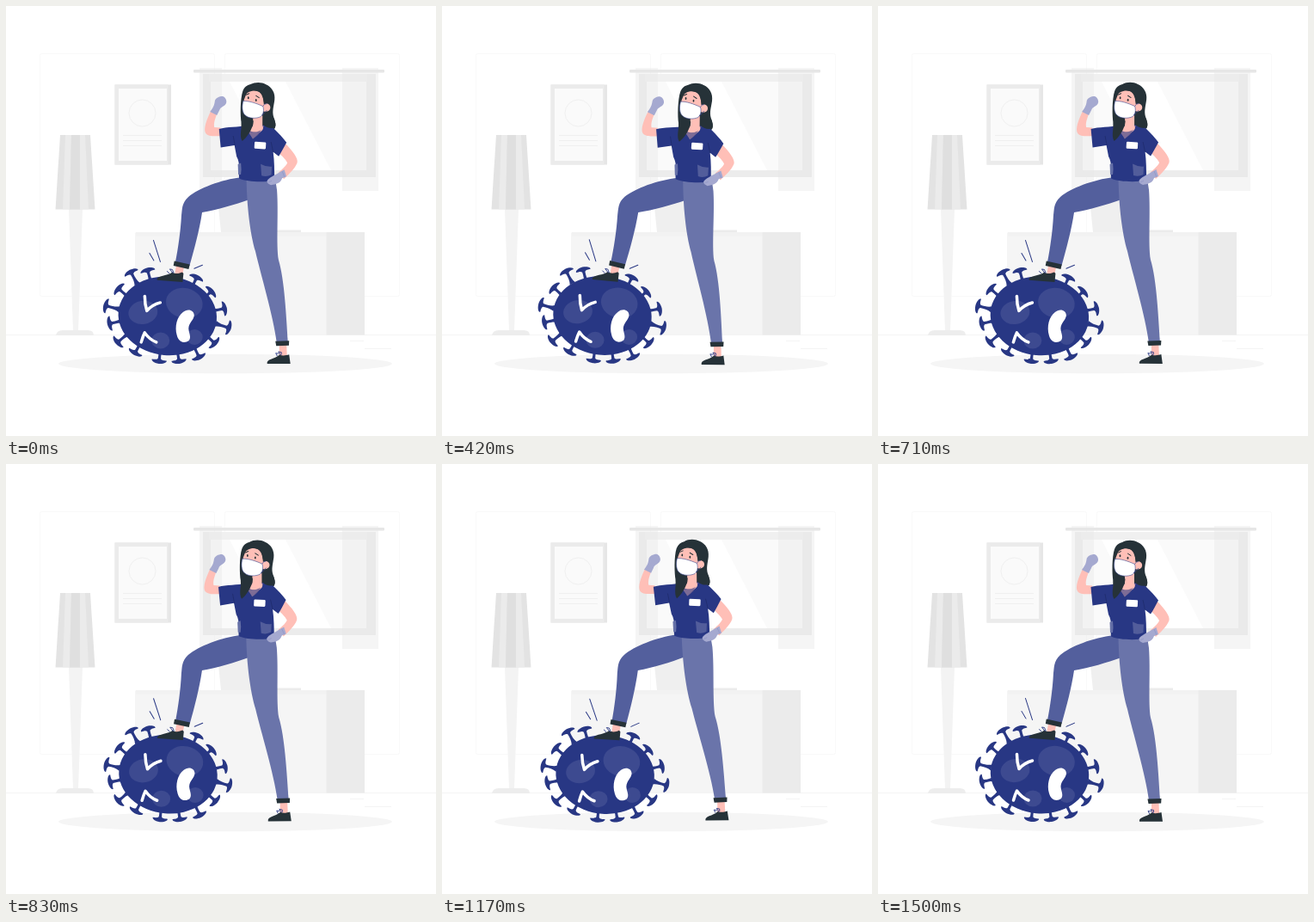
An HTML page for the animation above (1.54 s loop, 500x500 px).

```html
<!DOCTYPE html>
<html lang="en">
<head>
<meta charset="utf-8">
<title>Victory pose</title>
<style>
  html, body { margin: 0; width: 100%; height: 100%; overflow: hidden; background: #fff; }
  svg { display: block; width: 100vw; height: 100vh; }
  .navy { fill: #283784; }
  .ink { fill: #263238; }
  .skin { fill: #ffbfb7; }
  .glove { fill: #a5a9d0; }
  .line { fill: none; stroke: #283784; stroke-linecap: round; }
</style>
</head>
<body>
<svg viewBox="0 0 500 500">
  <g id="room">
    <g fill="none" stroke="#f9f9f9">
      <rect x="39.500" y="55.500" width="203" height="282" rx="2"/>
      <rect x="254.500" y="55.500" width="203" height="282" rx="2"/>
      <path d="M0 382.500H500" stroke="#f4f4f4"/>
      <path d="M400 389.500H416M417 398.500H448" stroke="#f4f4f4"/>
    </g>

    <!-- window -->
    <rect x="229" y="79" width="201" height="120" fill="#ececec"/>
    <rect x="236" y="79" width="184" height="9" fill="#f0f0f0"/>
    <rect x="238" y="88" width="181" height="103" fill="#fafafa"/>
    <path d="M260 88H325L378 191H313Z" fill="#fff"/>
    <g fill="#e8e8e8" opacity=".4">
      <path d="M225 72H251V215H225ZM391 72H433V215H391Z"/>
      <path d="M230 72H236V215H230ZM241 72H246V215H241ZM397 72H405V215H397ZM410 72H419V215H410ZM424 72H428V215H424Z"/>
    </g>
    <rect x="218" y="74" width="222" height="3.500" rx="1" fill="#e6e6e6"/>

    <!-- framed certificate -->
    <rect x="126.500" y="91.500" width="65.500" height="93" fill="#e6e6e6"/>
    <rect x="126.500" y="91.500" width="62" height="93" fill="#ebebeb"/>
    <rect x="131" y="96" width="56" height="84" fill="#fafafa"/>
    <g fill="none" stroke="#f0f0f0">
      <circle cx="158.500" cy="124.500" r="15.500"/>
      <path d="M136 150.500H181M136 156.500H181M136 162.500H181"/>
    </g>

    <!-- desk -->
    <path d="M246 224H289V263H250Z" fill="#efefef"/>
    <rect x="284" y="260.500" width="59" height="3" fill="#ebebeb"/>
    <rect x="150" y="263" width="267" height="119.500" rx="1.500" fill="#f5f5f5"/>
    <rect x="151" y="263" width="222" height="4.500" fill="#f2f2f2"/>
    <rect x="372.500" y="263" width="44.500" height="119.500" fill="#ebebeb"/>

    <!-- lamp -->
    <path d="M73 236H89L84 378H78Z" fill="#f3f3f3"/>
    <path d="M58 383Q59 377 66 377H95Q102 377 102 383Z" fill="#ededed"/>
    <path d="M63 150H98L103.500 236.500H57.500Z" fill="#e3e3e3"/>
    <path d="M69 150H76L74 236.500H66ZM86 150H92L96 236.500H86Z" fill="#ebebeb"/>
    <path d="M76 150H86V236.500H74Z" fill="#dfdfdf"/>

    <ellipse cx="255" cy="416" rx="194" ry="11.300" fill="#f5f5f5"/>
  </g>

  <g id="hero">
    <!-- virus -->
    <g id="spikes" class="navy"></g>
    <ellipse class="navy" cx="188" cy="360.500" rx="57.300" ry="45.800" transform="rotate(5 188 360.500)"/>
    <g fill="#3d4a90">
      <ellipse cx="207.500" cy="345.500" rx="21.500" ry="17.500" transform="rotate(12 207.500 345.500)"/>
      <ellipse cx="159.500" cy="356.500" rx="17" ry="13.500" transform="rotate(-10 159.500 356.500)"/>
      <ellipse cx="180" cy="389" rx="10.500" ry="9.500"/>
      <ellipse cx="219.500" cy="385" rx="9.500" ry="9"/>
    </g>
    <path d="M161.500 337.500Q161.500 347 164 354.500Q170 347.500 179.500 345M157.500 391Q159.500 384 161.500 380Q167 388 175 391" fill="none" stroke="#fff" stroke-width="3.500" stroke-linecap="round" stroke-linejoin="round"/>
    <path d="M206 356C211 351.500 219 353 219 360C218 366 213 368 212.500 375C213 381 216 385 213 389C208 393 201 391 199 383C196 373 199 361 206 356Z" fill="#fff"/>
    <path class="line" d="M171.500 272.500L179.500 297.500M167 287.500L172 296M219 305.300L228.500 301.200"/>

    <!-- front leg on the virus -->
    <path class="skin" d="M198 302L207 304L205 314H196Z"/>
    <path class="ink" d="M175.500 317.500C178 313 188 314 193.500 309.500C197 312 202 311 205 309.500L206.500 311L205.500 321L176 318.800Z"/>
    <path class="line" d="M190 311L187.500 308.500M194 310.500L190.500 306L193.500 306.500L195 310" stroke-width=".9"/>
    <path d="M274 199C250 202 224 212 212 222C204 229 205 237 204 243C203 263 200 283 197 298L213.500 302C219 283 225 260 228 240C246 237 266 231 283 225L284 202Z" fill="#535f9d"/>
    <path class="ink" d="M195.800 296.500L213.800 300.500L212.500 306L194.800 302Z"/>

    <!-- standing leg -->
    <path class="skin" d="M318 393H326.500L327 407H318Z"/>
    <path class="ink" d="M304 415.800C303 410 312 411 318.500 405.300C322 407 326 406 329.500 405L331 415.800Z"/>
    <path class="line" d="M315.500 406.500L314 403.500L317 404M319.500 405.500L317 401.800L320.500 402.500V405" stroke-width=".9"/>
    <path d="M279.500 201C280 233 284 265 290 285C296 311 311 360 315 391L328 390C326 360 324 318 317 295C314 277 317 240 315 214L313 201Z" fill="#6a74aa"/>
    <path class="ink" d="M313.500 389.500L329.500 389L329.200 394.500L314.500 395Z"/>

    <!-- arms -->
    <path class="skin" d="M238.500 121C233 132 229 143 232 148C235 152 242 151.500 251 151L249 141.500L242 141C241 136 243 131 245.500 124Z"/>
    <path class="glove" d="M237 123C241 118 242 115 242.500 111C243 107 248 105 251.500 105C254 105 256.500 109 256 112C255 117 249 117 248 121L245 127Z"/>
    <path class="skin" d="M324 159C333 168 340 177 338.500 182C336 189 328 196 323 201L317 193C322 189 326 185 327 182C325 178 320 173 315 169Z"/>

    <!-- back hair -->
    <path class="ink" d="M284 91C289 88 297 88 302 91C309 94 313 101 312 109C311 117 309 122 311 129C313 134 314 138 312.500 142L309 144H284C281 148 278 154 274.500 157C271 151 274 143 273.500 136C272 128 272 108 275 99C277 94 280 92 284 91Z"/>

    <!-- torso -->
    <path class="navy" d="M247.500 143C256 140.500 270 141 281 139C286 141 293 140 300 138C305 139 309 140 312 143C317 148 322 153 326 158.500C323 164 320 170 317 174.500L310.500 169.500C312 180 312 192 312 203C298 205 280 204.500 271 200.500C270 193 273 184 268 175L265.500 162L249.500 164.500Z"/>
    <path d="M264 151L266 162M310.500 169.500L308 158" fill="none" stroke="#1d2a69" stroke-width=".7"/>
    <path class="ink" d="M299 130H311C313 135 314 138 312.500 141C308 143 302 141 299 138Z"/>
    <path d="M280 140L286.500 154.500C292 151 297 146 300 139Z" fill="#6c5f8f"/>
    <path class="skin" d="M287 127H298V139C300 142 298 146 293 147C288 147 282 146 281 142Q287 142 287 138Z"/>
    <path d="M281 146Q289 148 297 144L287 154.500Z" fill="#7d6c96"/>
    <path d="M296 183.500Q302 187 309 186.500L308.500 196Q303 199 297 197Z" fill="#525d9b"/>
    <path d="M269.500 184L273 182.500Q274 190 273 196H270Z" fill="#6570a7"/>
    <rect x="288.700" y="158" width="13.300" height="8" rx="1.200" fill="#fff" transform="rotate(3 295 162)"/>
    <path class="glove" d="M318 193L323.500 190L326 198L321 200C319 206 314 207 308 208C305 207 303 205 303.500 203C306 199 312 197 318 193Z"/>
    <path d="M321 192L324 199M305 205L309 203" fill="none" stroke="#8d93c4" stroke-width=".7"/>

    <!-- head -->
    <path class="ink" d="M276 123C280 128 286 130 287.500 134C287 143 279 154 274.500 157C271 151 274 143 273.500 136Z"/>
    <path class="skin" d="M280 100C283 97 294 97 298 103L300 114C304 112 308 115 307 119C306 123 301 123 299 122C298 129 292 131 285 130C277 127 275 118 276.500 109Z"/>
    <path class="ink" d="M275 109C276 104 279 102 282 100C285 98 290 98 293 99C297 101 299.500 107 299.500 114L304 112L308 99L291 90L277 96Z"/>
    <path d="M275.500 110.500C282 110 291 113 298.500 116.500C300 121 299 126 296 128.500C291 131 282 131 278 127C274 124 274 116 275.500 110.500Z" fill="#fff" stroke="#3d4a90" stroke-width=".6"/>
    <path d="M298.500 116.500Q300 113 303 113.500M297 127Q301 124 303 121" fill="none" stroke="#3d4a90" stroke-width=".7"/>
    <g class="ink">
      <ellipse cx="281.500" cy="106.700" rx=".9" ry="1.500"/>
      <ellipse cx="290.500" cy="109.300" rx=".9" ry="1.500"/>
    </g>
    <path d="M279 103.200L282.500 101.700M290.500 104.200L294 106.500" fill="none" stroke="#263238" stroke-width="1" stroke-linecap="round"/>
  </g>
</svg>
<script>
  const LOOP = 1540, STEPS = 37, SWAY = 1, PIVOT = "226 253.5";
  const hero = document.getElementById("hero");

  // Spike tips; each one points along the normal of the body's ellipse.
  const tips = [
    [144, 307], [164, 304.5], [223, 313], [241, 330], [257, 351], [262, 375],
    [245, 394], [226, 411], [202, 416], [178, 416], [149, 406], [128, 393],
    [118, 370], [113.5, 348], [129, 327]
  ];
  const shape = "M-3.500 19C-1.500 15 -1.300 10 -1.700 6C-3 4 -6 4.600 -8.500 4.500" +
    "C-9.500 3 -6 .2 0 0C6 .2 9.500 3 8.500 4.500C6 4.600 3 4 1.700 6C1.300 10 1.500 15 3.500 19Z";
  document.getElementById("spikes").innerHTML = tips.map(([x, y]) => {
    const nx = (x - 188) / 57.3 ** 2, ny = (y - 360.5) / 45.8 ** 2;
    const turn = Math.atan2(nx, -ny) * 180 / Math.PI;
    return `<path d="${shape}" transform="translate(${x} ${y}) rotate(${turn})"/>`;
  }).join("");

  // Triangle wave: 0, 1, 0, -1, 0 over one turn.
  const triangle = p => 4 * Math.abs((p + 0.75) % 1 - 0.5) - 1;

  const start = performance.now();
  function draw(now) {
    const t = Math.max(0, now - start) % LOOP;
    const step = Math.floor(t / LOOP * STEPS + 0.05);
    const angle = SWAY * triangle((step + 1) / STEPS);
    hero.setAttribute("transform", `rotate(${angle} ${PIVOT})`);
    requestAnimationFrame(draw);
  }
  draw(start);
</script>
</body>
</html>
```
